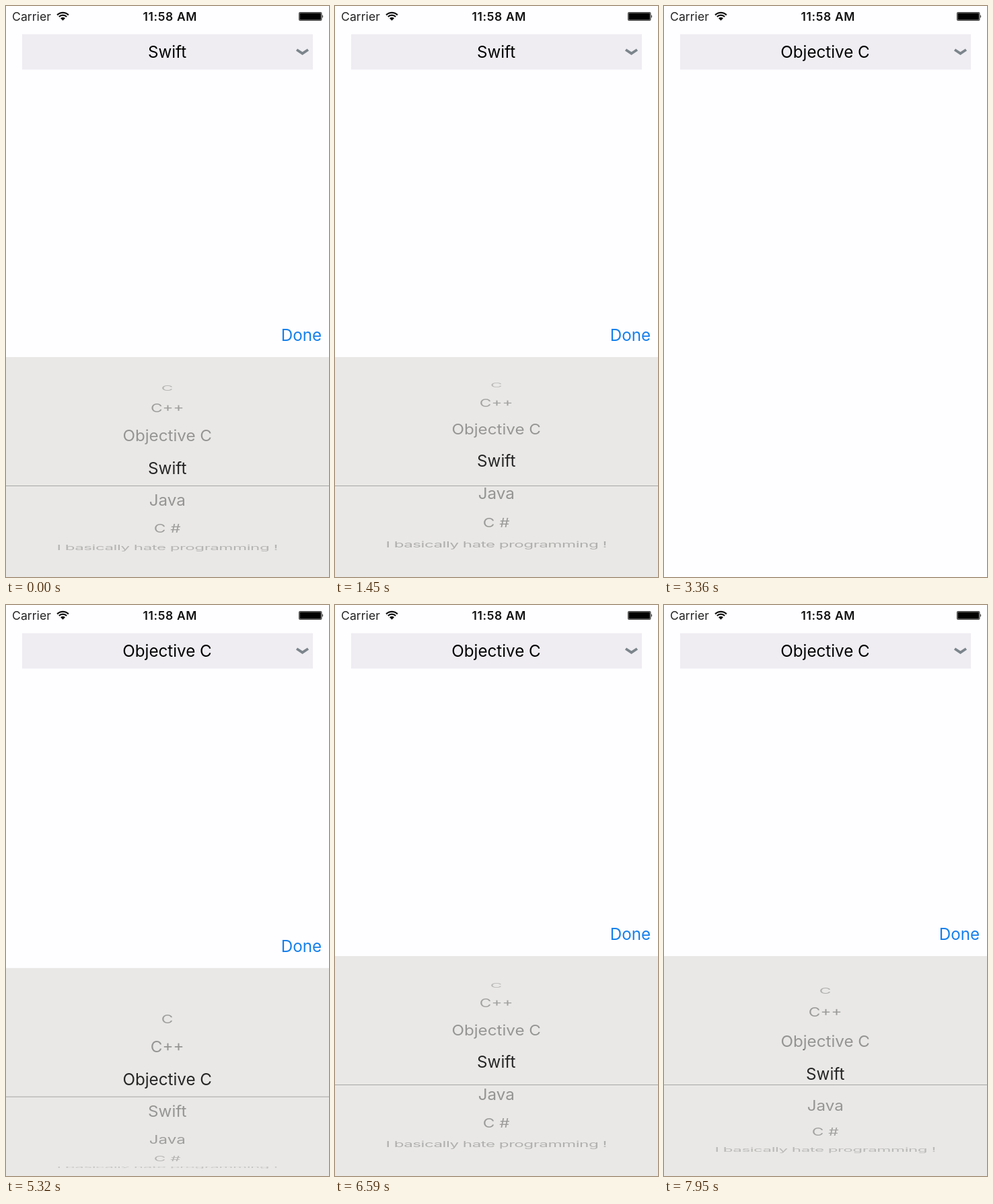
An HTML page that plays this animation: 480x849 px, repeating every 8000 ms.

```html
<!DOCTYPE html>
<html lang="en">
<head>
<meta charset="utf-8">
<title>Language picker</title>
<style>
  html, body { margin: 0; width: 100%; height: 100%; overflow: hidden; background: #fefdff; }
  svg { display: block; width: 100vw; height: 100vh; }
  text { font-family: Inter, Roboto, "Liberation Sans", sans-serif; font-size: 24.2px; }
  .mid { text-anchor: middle; }
  .carrier { font-size: 17.6px; letter-spacing: .05px; fill: #222; }
  .time { font-size: 17.5px; font-weight: 600; letter-spacing: .6px; fill: #111; }
  .done { fill: #1580ec; text-anchor: end; }
  .long { letter-spacing: -.5px; }
  .faded { fill: #949493; }
  .picked { fill: #262626; }
</style>
</head>
<body>
<svg viewBox="0 0 480 849">
  <defs>
    <clipPath id="band"><rect y="661" width="480" height="52"/></clipPath>
    <clipPath id="rest"><path d="M0 522h480v139H0zM0 713h480v136H0z"/></clipPath>
  </defs>

  <text class="carrier" x="9" y="22">Carrier</text>
  <g fill="none" stroke="#111" stroke-width="2.2">
    <path d="M76.1 13.4A11.9 11.9 0 0 1 92.9 13.4"/>
    <path d="M78.8 16.1A8 8 0 0 1 90.2 16.1"/>
    <path d="M84.5 21.8L81 18.3A5 5 0 0 1 88 18.3Z" fill="#111" stroke="none"/>
  </g>
  <text class="time mid" x="243.8" y="22">11:58 AM</text>
  <rect x="435" y="9" width="34.5" height="13" rx="2" fill="#444"/>
  <rect x="436" y="10" width="32.5" height="11" rx="1.2" fill="#777"/>
  <rect x="436.8" y="10.8" width="30.9" height="9.4" rx="1"/>
  <path d="M470 13q2.4 2.5 0 5z" fill="#333"/>

  <rect x="24" y="42" width="432" height="52.5" fill="#efedf2"/>
  <text id="choice" class="mid" x="239.5" y="77">Swift</text>
  <path d="M432 65L440.5 70.7L449 65" fill="none" stroke="#7c858c" stroke-width="3.8"/>

  <g id="panel">
    <text class="done" x="469.2" y="498">Done</text>
    <rect y="522" width="480" height="340" fill="#e9e8e6"/>
    <g id="faded" class="faded" clip-path="url(#rest)"></g>
    <g id="picked" class="picked" clip-path="url(#band)"></g>
    <rect y="713" width="480" height="1" fill="#a6a6a5"/>
  </g>
</svg>
<script>
  const LOOP = 8000;
  const LANGS = ["C", "C++", "Objective C", "Swift", "Java", "C #", "I basically hate programming !"];
  const START_ROW = 3;
  const RADIUS = 132, CENTER = 687, STEP = 21.3 * Math.PI / 180;
  const HIDDEN = 393;

  // [ms, rows the wheel has turned downwards]
  const TURNS = [
    [0, 0], [1050, 0], [1200, -.16], [1340, -.3], [1450, -.224], [1580, .2], [1690, .7], [1770, .9],
    [2100, .9], [2140, .96], [2270, 1], [5600, 1], [5800, .93], [6090, .66], [6140, .66],
    [6300, .3], [6450, 0], [6590, -.163], [6750, -.25], [6910, -.28],
    [7410, -.28], [7550, -.08], [7780, -.08], [7950, .204], [8000, .204]
  ];

  const $ = id => document.getElementById(id);
  const choice = $("choice"), panel = $("panel");

  function addRow(group, label, i) {
    const el = document.createElementNS("http://www.w3.org/2000/svg", "text");
    el.textContent = label;
    el.setAttribute("y", 8.8);
    el.setAttribute("class", label.length > 20 ? "mid long" : "mid");
    group.appendChild(el);
    return { el, i };
  }
  const rows = ["faded", "picked"].flatMap(id => LANGS.map((label, i) => addRow($(id), label, i)));

  function sample(keys, t) {
    const n = Math.max(1, keys.findIndex(k => k[0] >= t));
    const [t0, a] = keys[n - 1], [t1, b] = keys[n];
    return a + (b - a) * (t - t0) / (t1 - t0);
  }

  function slide(t) {
    if (t < 2970) return 0;
    if (t < 3360) {
      const p = (t - 2970) / 390;
      return HIDDEN * p * p * (3 - 2 * p);
    }
    if (t < 5320) return HIDDEN;
    return 18 * Math.exp((5320 - t) / 70);
  }

  function turnWheel(turn) {
    for (const { el, i } of rows) {
      const angle = (i - START_ROW + turn) * STEP;
      const sin = Math.sin(angle), cos = Math.cos(angle);
      const seen = Math.abs(angle) < Math.PI / 2;
      el.style.display = seen ? "" : "none";
      if (!seen) continue;
      const y = CENTER + RADIUS * sin;
      el.setAttribute("transform", `translate(239.7 ${y.toFixed(2)}) scale(1 ${cos.toFixed(4)})`);
      el.setAttribute("opacity", (1 - .6 * sin ** 4).toFixed(3));
    }
  }

  function draw(t) {
    const label = t < 2270 ? "Swift" : "Objective C";
    if (choice.textContent !== label) choice.textContent = label;
    panel.setAttribute("transform", `translate(0 ${slide(t).toFixed(2)})`);
    turnWheel(sample(TURNS, t));
  }

  const start = performance.now();
  function tick() {
    draw(Math.max(0, performance.now() - start) % LOOP);
    requestAnimationFrame(tick);
  }
  tick();
</script>
</body>
</html>
```
